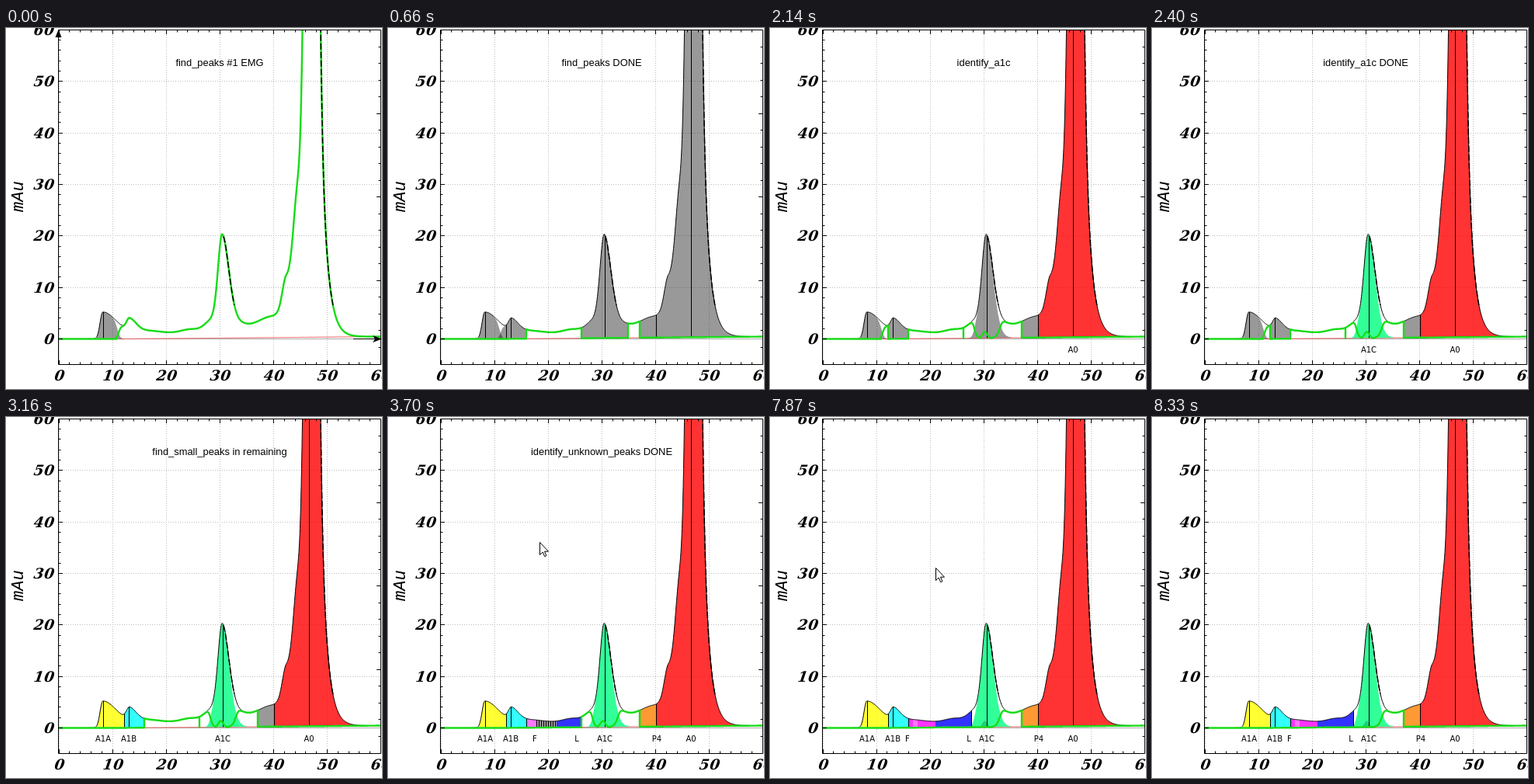
Recreate the animation shown at these times as an HTML page. Size 484x465 px, loop 8.66 s.

```html
<!DOCTYPE html>
<html>
<head>
<meta charset="utf-8">
<style>
html, body { margin: 0; width: 100%; height: 100%; overflow: hidden; background: #fff; }
svg { display: block; }
.num { font: italic bold 18.5px "DejaVu Serif", serif; letter-spacing: .6px; }
.unit { font: italic 22px "Liberation Mono", monospace; }
#title { font: 12.9px "Liberation Sans", Arial, sans-serif; text-anchor: middle; }
#labels { font: 10px "DejaVu Sans", sans-serif; text-anchor: middle; }
</style>
</head>
<body>
<svg width="484" height="465" viewBox="0 0 484 465">
  <clipPath id="plot"><rect x="67" y="2.5" width="416" height="431"/></clipPath>
  <g id="grid"></g>
  <g clip-path="url(#plot)" fill="none">
    <path id="red" stroke="#f24a4a"/>
    <g id="areas"></g>
    <path id="lines" stroke="#000"/>
    <path id="outline" stroke="#000"/>
    <path id="green" stroke="#18dc18" stroke-width="2.4" stroke-linejoin="round"/>
    <path id="tails" stroke="#000" stroke-width="1.5" stroke-dasharray="8 3"/>
  </g>
  <g id="axes"></g>
  <path id="arrows" d="M67.5 2l4 10h-8zM484 400.5l-12-4.5 3 4.5-3 4.5zM447 400h28v1h-28z"/>
  <text id="title" x="275" y="49"></text>
  <g id="labels"></g>
  <path id="cursor" d="M.5 .5v16l3.7-3.5 2.5 5.7 2.2-1-2.4-5.5h5z" fill="#fff" stroke="#000"/>
</svg>
<script>
const LOOP = 8660, START = 68, END = 483;
const $ = id => document.getElementById(id);
const px = v => Math.floor(68 + v * 6.91) + .5;
const py = v => Math.floor(400.5 - v * 6.635) + .5;
const base = x => 400.5 - 3 * Math.max(0, x - 150) / 332;

// The signal is a sum of lopsided bells: centre, height, left and right width.
const bell = (x, c, h, l, r = l) => h * Math.exp(-(((x - c) / (x < c ? l : r)) ** 2) / 2);
const bells = [
  [124.5, 34, 3.4, 17.5], [159, 15, 3.8, 8.5], [178, 10.5, 22, 34], [240, 9.5, 15, 18],
  [267, 20, 10, 10], [278.5, 120, 5.4, 8.8], [297, 12, 8, 11], [346, 28, 28, 10],
  [361, 65, 5.5, 10], [376, 160, 6, 8], [392, 1326, 5.8, 5.75]
];
const decay = x => x > 392 ? 1523 * Math.exp((392 - x) / 8) : 0;
const height = x => bells.reduce((sum, b) => sum + bell(x, ...b), decay(x));
const trace = x => base(x) - height(x);

// Parts of the signal that fade in or out around x0 over width w.
const fade = (x0, w) => x => base(x) - height(x) / (1 + Math.exp((x0 - x) / w));
const peak1 = fade(144, -1.8), peak2 = fade(145.7, 1.6);
const riseC = fade(263, 1.7), dropC = fade(297, -4);
const peakC = x => x < 278 ? riseC(x) : dropC(x);
const fall = fade(263, -1.5), rest = fade(297, 2);
const bump = x => base(x) - bell(x, 276.5, 8, 3);

const pt = (x, y) => x.toFixed(1) + " " + y.toFixed(1);
function run(f, a, b) {
  const out = [];
  for (let x = a; x < b; x += .5) out.push(pt(x, f(x)));
  out.push(pt(b, f(b)));
  return out.join("L");
}
const fillPath = (f, a, b) => `M${pt(a, base(a))}L${run(f, a, b)}L${pt(b, base(b))}Z`;
function greenPath(open) {
  let d = "M", x = START;
  for (const [f, a, b] of open) {
    d += run(base, x, a) + "L" + run(f, a, b) + "L";
    x = b;
  }
  return d + run(base, x, END);
}

// Areas are [curve, from, to, colour]; open ranges are where the green line leaves the baseline.
const GRAY = "#000", BLUE = "#00f", PINK = "#f0f", PALE = "#f5f";
const area = (f, a, b) => (color = GRAY) => [f, a, b, color];
const first = area(peak1, 117, 153), next = area(peak2, 142, 178), nextCut = area(peak2, 153, 178);
const a1a = area(trace, 117, 153)("#ff0"), a1b = area(trace, 153, 178)("#0ff");
const whole = area(trace, 249, 309), a1c = area(peakC, 254, 311);
const p4 = area(trace, 324, 346), a0 = area(trace, 346, 455);
const RED = a0("#f00"), TEAL = a1c("#00ff80"), ORANGE = p4("#ff8000");

const marks = [125.5, 152.5, 158.5, 279.5, 345.5, 390.5];
const stripes = Array.from({ length: 9 }, (_, i) => 191.5 + i * 3);
const LABEL = { A1A: 125, A1B: 158, A1C: 279, P4: 346, A0: 390 };
const tags = (...names) => names.map(n => [LABEL[n], n]);
const look = (areas, open, lines, labels = []) => ({ areas, open, lines, labels });

const found = [first(), next(), whole(), p4(), a0()];
const dips = [[trace, 178, 249], [trace, 309, 324]];
const tail = x => [trace, x, END];
const find = [
  look(found.slice(0, 1), [[peak2, 142, END]], marks.slice(0, 1)),
  look(found.slice(0, 2), [tail(178)], marks.slice(0, 3)),
  look(found.slice(0, 3), [dips[0], tail(309)], marks.slice(0, 4)),
  look(found.slice(0, 4), [...dips, tail(346)], marks.slice(0, 5)),
  look(found, dips, marks)
];
const five = find[4];

const split = [[peak2, 143, 152], [trace, 178, 249], [fall, 249, 270], [bump, 270, 283], [rest, 286, 324]];
const cut = look([first(), nextCut(), a1c(), p4(), a0()], split, marks);
const main = look([first(), nextCut(), a1c(), p4(), RED], split, marks, tags("A0"));
const second = look([first(), nextCut(), TEAL, p4(), RED], split, marks, tags("A0", "A1C"));
const third = look([a1a, nextCut(), TEAL, p4(), RED], split.slice(1), marks, tags("A0", "A1C", "A1A"));
const known = [a1a, a1b, TEAL, RED], knownTags = tags("A0", "A1C", "A1A", "A1B");
const fourth = look([...known, p4()], split.slice(1), marks, knownTags);

const F = [189, "F"], L = [243, "L"], P = [346, "P4"];
const small = (left, right, last, extra) => look(
  [...known, last, [trace, 178, 191, left], [trace, 191, 217, GRAY], [trace, 217, 249, right]],
  split.slice(2), [...marks, 178.5, 249, ...stripes], [...knownTags, ...extra]);
const filled = small(GRAY, GRAY, p4(), []);
const tagF = small(PALE, GRAY, p4(), [F]);
const tagL = small(PALE, BLUE, p4(), [F, L]);
const tagP = small(PALE, BLUE, ORANGE, [F, L, P]);
const done = look([...known, ORANGE, [trace, 178, 213, PINK], [trace, 213, 260, BLUE],
  [trace, 184, 190, "#fff6"], [bump, 270, 283, "#0a5a"]], split.slice(4), [...marks, 178.5, 259.5],
  [...knownTags, P, [177, "F"], [256, "L"]]);

// Evenly spaced steps from one time to another.
const seq = (from, to, list) =>
  list.map(([title, state], i) => [from + (to - from) * i / Math.max(1, list.length - 1), title, state]);
const identify = (name, before, after) =>
  [["", before], ["", after], [" DONE", after]].map(([end, s]) => ["identify_" + name + end, s]);
const move = "move_disconnected_areas ";
const removing = [3, 2, 1, 0].map(n => [move + "removing disconnected points #" + n, n ? five : cut]);
const c = identify("a1c", main, second);
const steps = [
  [0, "find_peaks #1 EMG", find[0]],
  ...seq(250, 660, [...find.slice(1).map((s, i) => [`find_peaks #${i + 2} EMG`, s]), ["find_peaks DONE", five]]),
  [840, move + "find points", five],
  ...seq(1170, 1580, [...removing, [move + "DONE", cut]]),
  ...seq(1730, 2220, [...identify("a0", cut, main), c[0], c[0], c[1]]),
  ...seq(2400, 3010, [c[2], ...identify("a1a", second, third), ...identify("a1b", third, fourth)]),
  ...seq(3160, 3290, [["find_small_peaks in remaining", fourth], ["find_small_peaks DONE", filled]]),
  ...seq(3470, 3700, [filled, filled, tagF, tagL, tagP, tagP].map((s, i) =>
    ["identify_unknown_peaks" + (i < 5 ? "" : " DONE"), s])),
  ...seq(3930, 4160, [["join_small_peaks", tagP], ["join_small_peaks", done], ["", done]])
];

const mix = (a, b, k) => a.map((v, i) => Math.round(v + (b[i] - v) * k));
function cursorAt(t) {
  const ticks = from => Math.floor((t - from) / 46);
  if (t < 3470) return null;
  if (t < 5050) return mix([195, 161], [40, 230], (1 - Math.min(1, ticks(3470) / 5)) ** 2);
  if (t < 7870) return [t < 5100 ? 196 : 197, 161];
  return ticks(7870) < 10 ? mix([213, 194], [418, 455], ticks(7870) / 9) : null;
}

function drawFrame() {
  let grid = "", small = "", text = "";
  for (let v = 0; v <= 60; v += 2) {
    const len = v % 10 ? 2.5 : 5;
    small += `M${px(v)} 433v${-len}M${px(v)} 3v${len}M68 ${py(v)}h${len}`;
    if (v % 10) continue;
    grid += `M68 ${py(v)}H482M${px(v)} 3V433`;
    const num = (x, y, anchor) =>
      `<text class="num" transform="translate(${x} ${y}) skewX(-8)" text-anchor="${anchor}">${v}</text>`;
    text += num(px(v), 453.5, "middle") + num(62, py(v) + 6.5, "end");
  }
  for (let i = 1; i < 20; i++) small += `M482 ${Math.floor(2.5 + i * 21.5) + .5}h${i % 5 ? -2.5 : -5}`;
  $("grid").innerHTML = `<path d="${grid}" stroke="#bdbdbd" stroke-dasharray="1 2"/>` +
    `<path d="M68 400.5H482" stroke="#aaa"/>`;
  $("axes").innerHTML = `<path d="M67.5 2.5H482.5V433.5H67.5Z${small}" fill="none" stroke="#000"/>${text}` +
    `<text class="unit" transform="translate(21.5 237) rotate(-90)">mAu</text>`;
  $("red").setAttribute("d", "M" + run(base, 145, END));
  $("outline").setAttribute("d", "M" + run(trace, START, END));
  $("tails").setAttribute("d", `M${run(trace, 280, 294)}M${run(trace, 404.5, 421)}`);
}

function show(title, s) {
  $("title").textContent = title;
  $("arrows").style.display = s === find[0] ? "" : "none";
  $("areas").innerHTML = s.areas.map(([f, a, b, color]) =>
    `<path d="${fillPath(f, a, b)}" fill="${color}" fill-opacity="${color === GRAY ? .4 : .8}"/>`).join("");
  $("lines").setAttribute("d", s.lines.map(x => `M${x} ${Math.max(0, trace(x))}V${base(x)}`).join(""));
  $("green").setAttribute("d", greenPath(s.open));
  $("labels").innerHTML = s.labels.map(([x, name]) => `<text x="${x}" y="418">${name}</text>`).join("");
}

let current = null;
function draw(t) {
  const step = steps.filter(s => s[0] <= t).pop();
  if (step !== current) {
    current = step;
    show(step[1], step[2]);
  }
  const at = cursorAt(t);
  $("cursor").style.display = at ? "" : "none";
  if (at) $("cursor").setAttribute("transform", `translate(${at})`);
}

drawFrame();
draw(0);
const start = performance.now();
function tick() {
  draw((performance.now() - start) % LOOP);
  requestAnimationFrame(tick);
}
requestAnimationFrame(tick);
</script>
</body>
</html>
```
